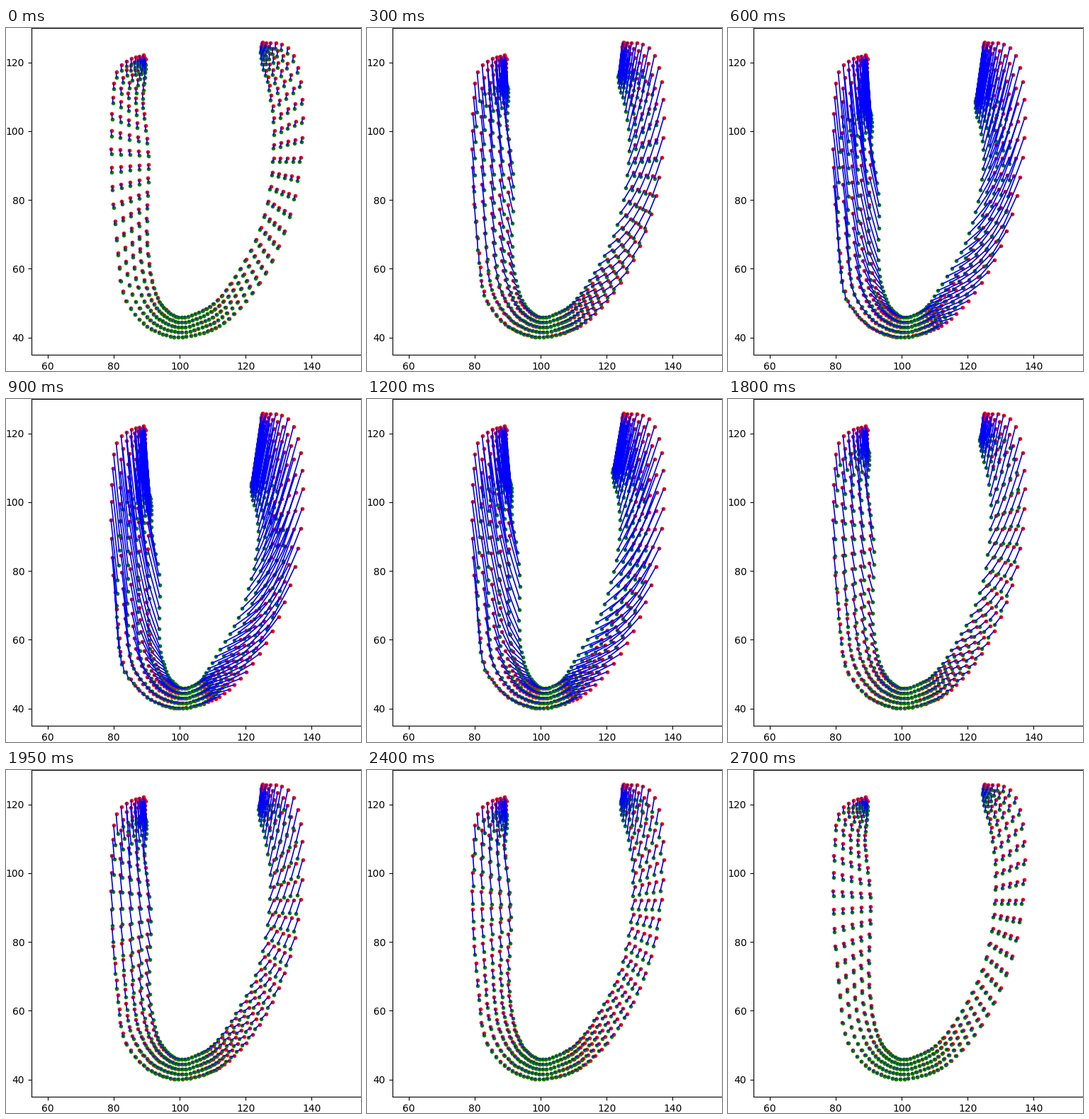
A matplotlib script for the animation above (2.85 s loop, 501 by 485 pixels).

```python
import numpy as np
import matplotlib.pyplot as plt
from matplotlib.animation import FuncAnimation

WIDTH, HEIGHT, DPI = 501, 485, 100
LEFT, BOTTOM, AX_W, AX_H = 36, 23, 465, 462
X_LIM, Y_LIM = (55, 155), (35, 130)
POINTS, LAYERS = 72, 5

# Wall at rest, in stage pixels: index, outer x, y, inner x, y
WALL = np.array([
    (0, 193, 38, 196, 44), (3, 176, 43, 195, 62), (5, 162, 52, 193, 80),
    (6, 155, 62, 192, 92), (8, 150, 98, 194, 121), (10, 148, 145, 198, 156),
    (12, 148, 197, 200, 193), (15, 153, 273, 198, 250), (18, 159, 338, 198, 303),
    (20, 164, 372, 201, 333), (22, 175, 396, 205, 357), (25, 193, 417, 213, 381),
    (29, 215, 430, 225, 398), (35, 248, 436.5, 247, 408.5), (41, 284, 428, 277, 399),
    (45, 307, 416, 298, 384), (48, 330, 395, 317, 361), (51, 357, 360, 338, 327),
    (54, 384, 308, 359, 282), (57, 407, 237, 373, 224), (59, 415, 183, 377, 184),
    (61, 418, 127, 378, 145), (63, 415, 76, 376, 110), (65, 405, 39, 371, 81),
    (66, 397, 28, 369, 69), (68, 380, 21, 363, 51), (71, 361, 20, 359, 27),
])

# Displacement at full contraction, same columns
SHIFT = np.array([
    (0, 8, 97, 7, 97), (6, 9, 94, 12, 89), (10, 10, 90, 15, 77),
    (14, 5, 59, 17, 63), (18, 1, 25, 18, 46), (22, 4, 6, 17, 18),
    (26, 5, 3, 14, 7), (30, 4, 1, 10, 2), (35, 1, 0, 4, 0),
    (40, -5, 1, -4, 1), (44, -13, 3, -16, 6), (48, -23, 9, -27, 12),
    (52, -27, 24, -30, 18), (56, -25, 46, -32, 38), (60, -27, 74, -26, 61),
    (65, -24, 92, -18, 84), (71, -15, 97, -14, 97),
])

# Share of the full displacement reached at each step of the heartbeat
ACROSS = [.04, .18, .37, .58, .78, .93, 1, 1, .93, .76,
          .56, .42, .32, .24, .20, .17, .14, .09, .05]
ALONG = [.08, .24, .43, .63, .81, .94, 1, .95, .79, .58,
         .40, .35, .32, .29, .26, .24, .21, .14, .075]


def spline(knots, values, at):
    """Natural cubic spline through the columns of values."""
    n, h = len(knots), np.diff(knots)
    system, rhs = np.eye(n), np.zeros_like(values)
    slope = np.diff(values, axis=0) / h[:, None]
    for i in range(1, n - 1):
        system[i, i - 1:i + 2] = h[i - 1], 2 * (h[i - 1] + h[i]), h[i]
        rhs[i] = 6 * (slope[i] - slope[i - 1])
    bend = np.linalg.solve(system, rhs)
    k = np.clip(np.searchsorted(knots, at, side="right") - 1, 0, n - 2)
    a, b, w = (knots[k + 1] - at)[:, None], (at - knots[k])[:, None], h[k][:, None]
    return ((bend[k] * a**3 + bend[k + 1] * b**3) / (6 * w)
            + (values[k] / w - bend[k] * w / 6) * a
            + (values[k + 1] / w - bend[k + 1] * w / 6) * b)


def mesh(table):
    """Spread the outer and inner curves over all layers: rows of x, y."""
    table = table.astype(float)
    curves = spline(table[:, 0], table[:, 1:], np.arange(POINTS))
    depth = np.linspace(0, 1, LAYERS)[:, None, None]
    return ((1 - depth) * curves[:, :2] + depth * curves[:, 2:]).reshape(-1, 2)


scale = np.array([np.ptp(X_LIM) / AX_W, -np.ptp(Y_LIM) / AX_H])
rest = np.array([X_LIM[0], Y_LIM[1]]) + (mesh(WALL) + 0.5 - [LEFT, 0]) * scale
shift = mesh(SHIFT) * scale

# The small margin keeps the pixel size from being rounded down
fig = plt.figure(figsize=((WIDTH + 0.01) / DPI, (HEIGHT + 0.01) / DPI), dpi=DPI)
ax = fig.add_axes([LEFT / WIDTH, BOTTOM / HEIGHT, AX_W / WIDTH, AX_H / HEIGHT])
ax.set(xlim=X_LIM, ylim=Y_LIM, xticks=range(60, 141, 20), yticks=range(40, 121, 20))

ax.plot(*rest.T, "r.")
moved_dots, = ax.plot([], [], "g.")
links, = ax.plot([], [], "b-", lw=1.2)


def update(step):
    moved = rest + shift * [ACROSS[step], ALONG[step]]
    gaps = np.full_like(rest, np.nan)
    moved_dots.set_data(*moved.T)
    links.set_data(*np.stack([rest, moved, gaps], axis=1).reshape(-1, 2).T)
    return moved_dots, links


anim = FuncAnimation(fig, update, frames=len(ALONG), interval=150,
                     repeat=True, repeat_delay=0)
plt.show()
```
